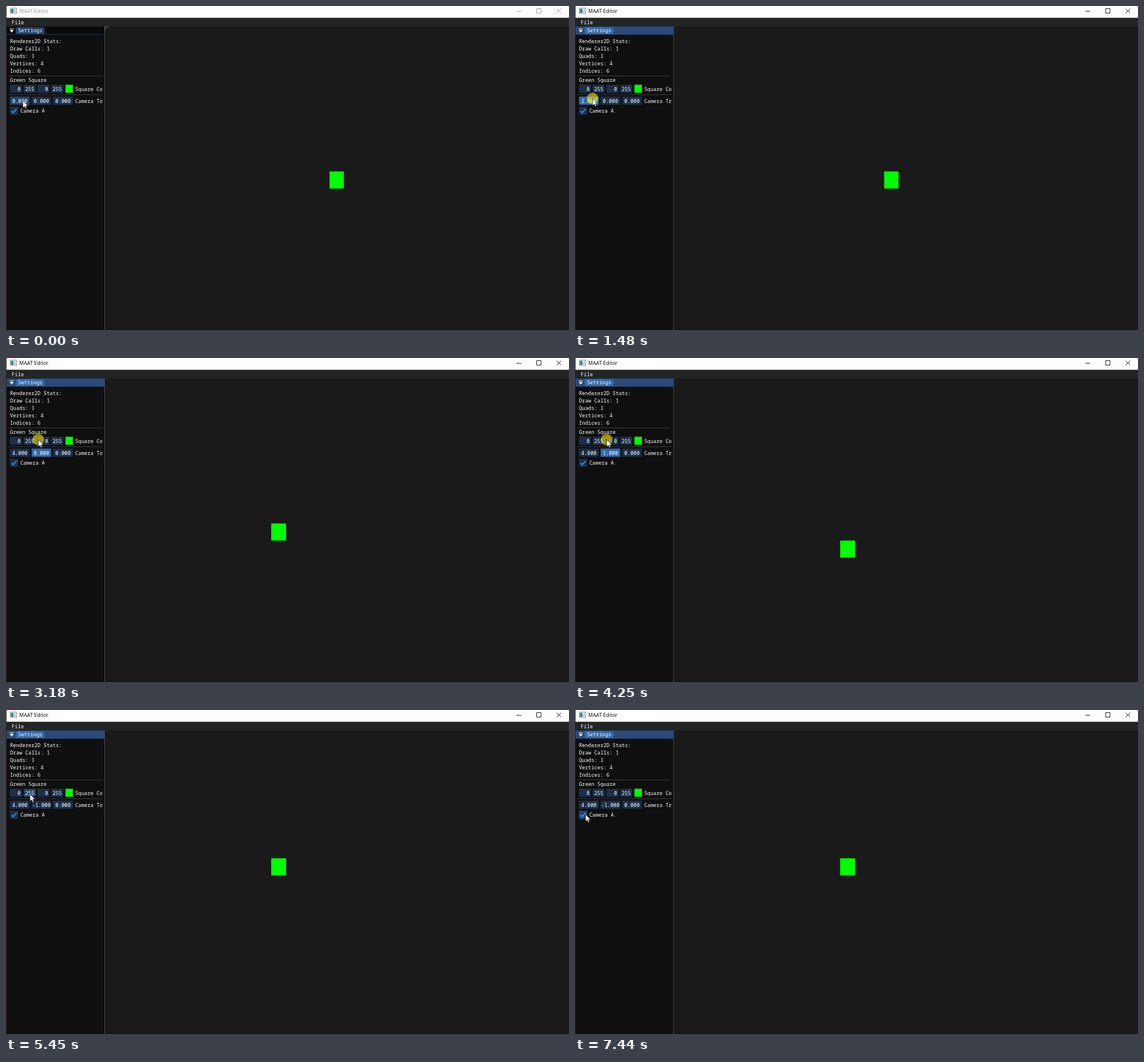
Write an HTML page that moves like this. It is 985x568 px and loops after 8000 ms.

```html
<!DOCTYPE html>
<html lang="en">
<head>
<meta charset="utf-8">
<title>MAAT Editor</title>
<style>
  html, body { margin: 0; width: 100%; height: 100%; overflow: hidden; background: #1a1a1a; }
  svg { display: block; width: 985px; height: 568px; }
  text { white-space: pre; }
  .ui text { font: 8.92px "Noto Sans Mono", "DejaVu Sans Mono", monospace; fill: #fff; }
  .title { font: 9px "Open Sans", "Noto Sans", sans-serif; }
</style>
</head>
<body>
<svg viewBox="0 0 985 568" xmlns="http://www.w3.org/2000/svg">
  <rect width="985" height="568" fill="#1a1a1a"/>
  <rect id="quad" fill="#0f0" shape-rendering="crispEdges"/>
  <rect y="566.5" width="985" height="1.5" fill="#121212"/>

  <rect y="20" width="985" height="16" fill="#242424"/>
  <rect width="985" height="20.6" fill="#fff"/>
  <rect x="7.5" y="3.5" width="11" height="9.5" fill="#eef1f2" stroke="#8b969c"/>
  <rect x="8.5" y="5" width="4.5" height="7" fill="#3d7c93"/>
  <rect x="14" y="5" width="3.5" height="7" fill="#c9d0d3"/>
  <text id="title" class="title" x="23" y="12">MAAT Editor</text>
  <path id="buttons" d="M893 9.2h8.5M928.5 4.5h7.5v8h-7.5zM963.3 4.7l7.8 7.8M971.1 4.7l-7.8 7.8" fill="none"/>

  <g class="ui">
    <text x="10" y="31.6">File</text>
    <rect y="36" width="172" height="532" fill="#0f0f0f"/>
    <rect id="edge" width="1" height="568"/>
    <rect id="bar" x="1" y="36" width="171" height="13.7"/>
    <path id="tab" d="M1 48.9H17V40q0-3 3-3H64.5q3 0 3 3v8.9H172v.8H1z"/>
    <path d="M6.5 39.5h7v1.1h-7zM6.5 42h7l-3.5 4.6z" fill="#fff"/>
    <text x="21" y="46.4">Settings</text>
    <rect x="172" y="36" width="1" height="532" fill="#4b4b53"/>
    <path id="corner" fill="none"/>
    <path d="M4 122.4H168.5M4 155.6H168.5" stroke="#43434b" stroke-width=".9"/>
    <g id="panel"></g>
  </g>

  <circle id="halo" r="10" fill="#ffee10" opacity=".57"/>
  <path id="cursor" d="M0 0V12.6L2.9 9.9 4.8 14.2 6.8 13.3 4.9 9.2H9z" fill="#fff" stroke="#111" stroke-width=".7"/>
</svg>
<script>
const LOOP = 8000;
const $ = id => document.getElementById(id);
const panel = $('panel');

function set(el, attrs) {
  for (const name in attrs) el.setAttribute(name, attrs[name]);
}

function add(tag, attrs, text = '') {
  const el = document.createElementNS('http://www.w3.org/2000/svg', tag);
  set(el, attrs);
  el.textContent = text;
  return panel.appendChild(el);
}

const label = (x, y, text) => add('text', { x, y }, text);

// A framed widget with centred text and a pointer hit area.
function field(x, y, width, text, hitWidth = width) {
  const box = add('rect', { x, y, width, height: 14.4 });
  const value = add('text', { x: x + width / 2, y: y + 10.9, 'text-anchor': 'middle' }, text);
  const hit = p => p.x >= x && p.x <= x + hitWidth && p.y >= y && p.y <= y + 14.4;
  return { box, value, hit };
}

['Renderer2D Stats:', 'Draw Calls: 1', 'Quads: 1', 'Vertices: 4', 'Indices: 6']
  .forEach((line, i) => label(7, 64.9 + 13 * i, line));
label(7, 133.4, 'Green Square');

const channels = ['  0', '255', '  0', '255'].map((v, i) => field(7 + 24 * i, 138, 21, v));
add('rect', { x: 104, y: 138, width: 13, height: 14, fill: '#0f0' });
label(121, 148.9, 'Square Co');

const axes = [0, 1, 2].map(i => field(7 + 37.7 * i, 158.8, 34.5, '0.000'));
label(121, 169.7, 'Camera Tr');

const check = field(7, 176.6, 14.3, '', 62);
const tick = add('path', { d: 'M9.7 184.2l2.8 2.9 6-6.6', fill: 'none', stroke: '#4296fa', 'stroke-width': 1.8 });
label(25, 187.3, 'Camera A');

const widgets = [...channels, ...axes, check];

const clamp = (v, lo, hi) => Math.min(hi, Math.max(lo, v));
const smooth = f => f * f * (3 - 2 * f);

const home = { x: 29.5, y: 166 };
const moves = [
  { from: 80, to: 500, y: 162 },
  { from: 970, to: 1200, x: 26 },
  { from: 1230, to: 1585, x: 32 },
  { from: 1890, to: 2170, x: 62 },
  { from: 2350, to: 3180, x: 56.5, y: 143 },
  { from: 3410, to: 3640, x: 60 },
  { from: 3840, to: 4230, x: 55.5 },
  { from: 4290, to: 4480, x: 51 },
  { from: 4810, to: 5090, x: 54.4, y: 141 },
  { from: 5320, to: 5450, x: 42, y: 147.5 },
  { from: 5500, to: 5780, x: 18.5, y: 183 }
];

const presses = [
  { from: 330, to: 1890, widget: axes[0] },
  { from: 2350, to: 5320, widget: axes[1] },
  { from: 6030, to: 6370, widget: check },
  { from: 7260, to: 7440, widget: check }
];

// Horizontal pointer travel sets a camera axis in whole units.
const UNIT = 0.55;
const drags = [
  { from: 970, to: 1890, origin: 29.8 },
  { from: 3410, to: 5320, origin: 55 }
];
const LAG = 25;

function pointer(t) {
  const p = { ...home };
  for (const m of moves) {
    const f = smooth(clamp((t - m.from) / (m.to - m.from), 0, 1));
    p.x += ((m.x ?? p.x) - p.x) * f;
    p.y += ((m.y ?? p.y) - p.y) * f;
  }
  return p;
}

function camera(t) {
  return drags.map(d => {
    if (t < d.from) return 0;
    const travel = pointer(Math.min(t, d.to)).x - d.origin;
    return Math.round(travel / UNIT) || 0;
  });
}

function draw(t) {
  const focused = t >= presses[0].from;
  const press = presses.find(p => t >= p.from && t < p.to);
  const checked = t < 6300 || t >= 7400;
  const p = pointer(t);

  set($('title'), { fill: focused ? '#000' : '#999' });
  set($('buttons'), { stroke: focused ? '#111' : '#999' });
  set($('edge'), { fill: focused ? '#222' : '#303030' });
  set($('bar'), { fill: focused ? '#294a7a' : '#0a0a0a' });
  set($('tab'), { fill: focused ? '#3369ad' : '#23436c' });
  set($('corner'), {
    d: focused ? 'M173 36.5h7' : 'M173.5 42V36.5h6.5',
    stroke: focused ? '#3a3a3a' : '#66666c'
  });

  for (const w of widgets) {
    const held = press && press.widget === w;
    const hover = !press && w.hit(p);
    set(w.box, { fill: held ? '#316aac' : hover ? '#24456d' : '#1d2f49' });
  }
  camera(t).forEach((v, i) => { axes[i].value.textContent = v.toFixed(3); });
  set(tick, { visibility: checked ? 'visible' : 'hidden' });

  // The scene follows the panel values slightly late.
  const [cx, cy] = camera(t - LAG);
  set($('quad'), checked
    ? { x: 566 - 25.4 * cx, y: 290 + 30 * cy, width: 25.4, height: 30 }
    : { x: 376, y: 170, width: 406, height: 270 });

  set($('halo'), { cx: p.x, cy: p.y, visibility: press ? 'visible' : 'hidden' });
  set($('cursor'), { transform: `translate(${p.x} ${p.y})` });
}

const start = performance.now();
function frame(now) {
  draw(Math.max(0, now - start) % LOOP);
  requestAnimationFrame(frame);
}
draw(0);
requestAnimationFrame(frame);
</script>
</body>
</html>
```
